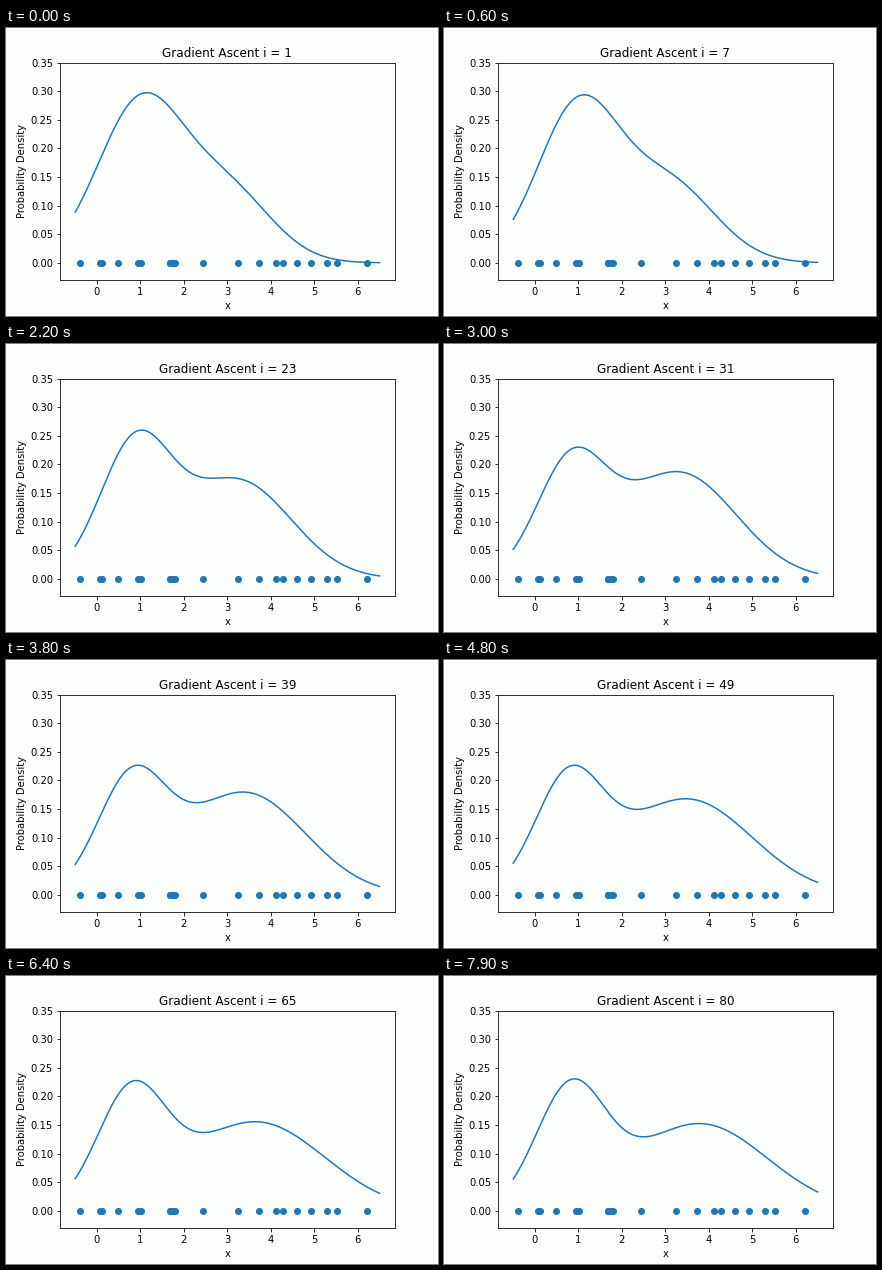
Recreate the animation shown at these times as a matplotlib script. Size 432x288 px, loop 8000 ms.

```python
import numpy as np
import matplotlib.pyplot as plt
from matplotlib.animation import FuncAnimation

STEPS = 80
RATE = 0.01
PAPER = "#fdfffd"

data = np.array([-0.39, 0.12, 0.94, 1.67, 1.76, 2.44, 3.72, 4.28, 4.92, 5.53,
                 0.06, 0.48, 1.01, 1.68, 1.80, 3.25, 4.12, 4.60, 5.28, 6.22])
xs = np.linspace(-0.5, 6.5, 200)


def normal(x, mu, sd):
    return np.exp(-((x - mu) / sd) ** 2 / 2) / (sd * np.sqrt(2 * np.pi))


def parts(x, p):
    mix, mu1, sd1, mu2, sd2 = p
    return (1 - mix) * normal(x, mu1, sd1), mix * normal(x, mu2, sd2)


def gradient(p):
    """Gradient of the log likelihood of the two-component mixture."""
    mix, mu1, sd1, mu2, sd2 = p
    a, b = parts(data, p)
    r = b / (a + b)
    z1, z2 = (data - mu1) / sd1, (data - mu2) / sd2
    return np.array([
        np.sum(r / mix - (1 - r) / (1 - mix)),
        np.sum((1 - r) * z1) / sd1,
        np.sum((1 - r) * (z1 ** 2 - 1)) / sd1,
        np.sum(r * z2) / sd2,
        np.sum(r * (z2 ** 2 - 1)) / sd2,
    ])


def ascend():
    p = np.array([0.3, 1.0, 1.0, 3.0, 1.0])
    curves = []
    for _ in range(STEPS):
        p = p + RATE * np.clip(gradient(p), -1, 1)
        curves.append(sum(parts(xs, p)))
    return curves


curves = ascend()

plt.rcParams["font.family"] = "DejaVu Sans"
fig = plt.figure(figsize=(6, 4), dpi=72, facecolor=PAPER)
ax = fig.add_axes([0.125, 0.125, 0.775, 0.755], facecolor=PAPER)
line, = ax.plot(xs, curves[0], color="C0", lw=1.5)
ax.scatter(data, np.zeros_like(data), color="C0")
ax.set_xlim(-0.85, 6.85)
ax.set_ylim(-0.03, 0.35)
ax.set_xticks(range(7))
ax.set_yticks(np.arange(8) * 0.05)
ax.set_xlabel("x")
ax.set_ylabel("Probability Density")
title = ax.set_title("Gradient Ascent i = 1")


def draw(k):
    line.set_ydata(curves[k])
    title.set_text(f"Gradient Ascent i = {k + 1}")
    return line, title


anim = FuncAnimation(fig, draw, frames=STEPS, interval=100, repeat=True,
                     repeat_delay=0, blit=False)
plt.show()
```
